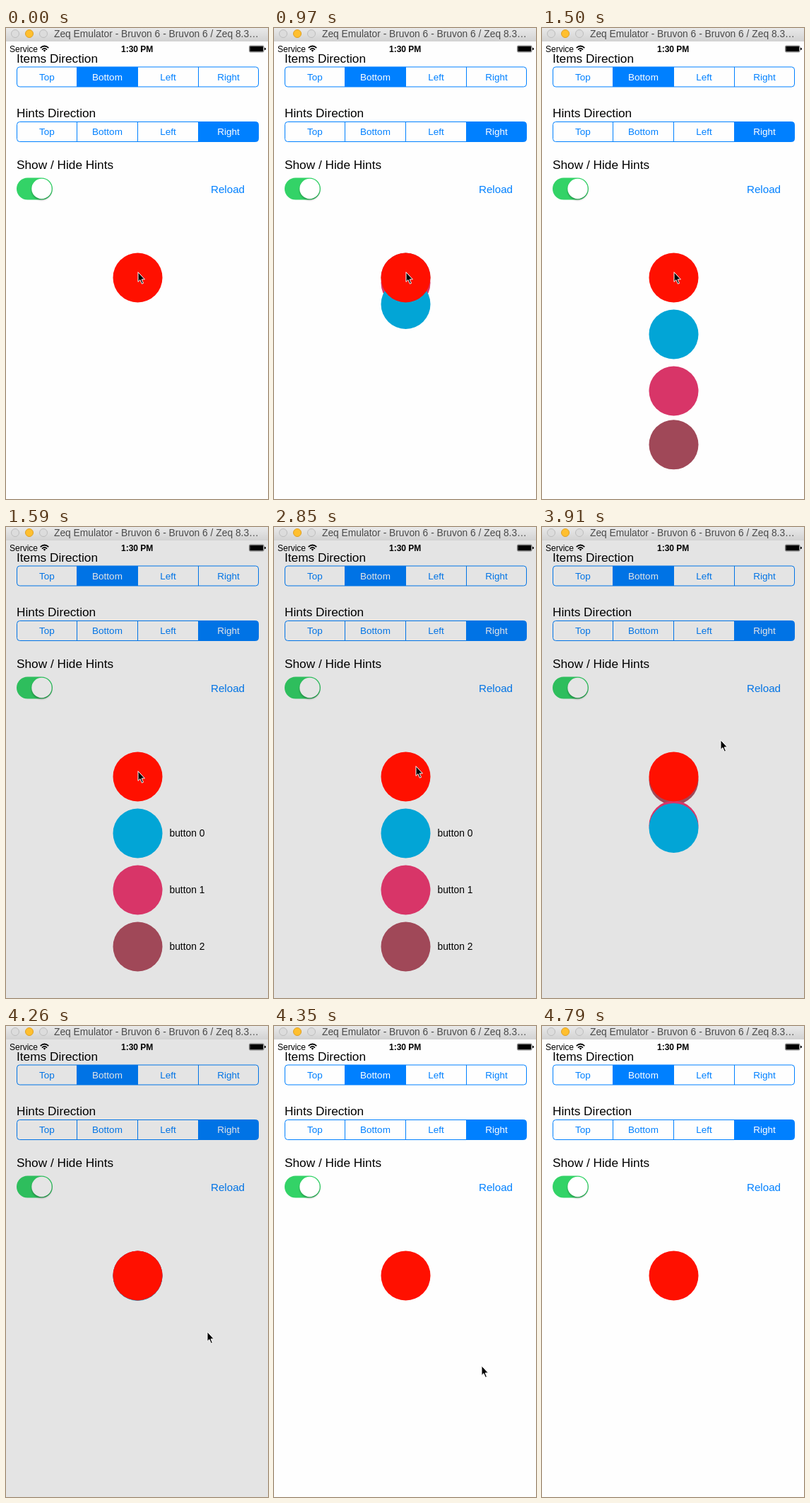
An HTML page for the animation above (5150 ms loop, 371 by 665 pixels).

```html
<!DOCTYPE html>
<html lang="en">
<head>
<meta charset="utf-8">
<title>Expanding button menu</title>
<style>
  html, body { margin: 0; width: 100%; height: 100%; overflow: hidden; background: #fefefe; }
  svg { display: block; width: 100vw; height: 100vh; font-family: "Liberation Sans", sans-serif; }
  .heading { font-size: 17.25px; }
  .segment { font-size: 13.5px; text-anchor: middle; }
  .blue { fill: #0080ff; }
  .white { fill: #fff; }
</style>
</head>
<body>
<svg viewBox="0 0 371 665">
  <defs>
    <linearGradient id="chrome" x2="0" y2="1">
      <stop stop-color="#e9e9e9"/><stop offset="1" stop-color="#d2d2d2"/>
    </linearGradient>
    <filter id="soft" x="-30%" y="-30%" width="160%" height="160%"><feGaussianBlur stdDeviation="1.3"/></filter>
  </defs>

  <rect width="371" height="665" fill="#fefefe"/>

  <rect width="371" height="19" fill="url(#chrome)"/>
  <g fill="#dcdcdc" stroke="#bdbdbd">
    <circle cx="13" cy="8" r="5.5"/>
    <circle cx="33" cy="8" r="5.5" fill="#ffbf2f" stroke="#dfa023"/>
    <circle cx="53" cy="8" r="5.5"/>
  </g>
  <text x="68" y="13" font-size="13.8" fill="#4a4a4a">Zeq Emulator - Bruvon 6 - Bruvon 6 / Zeq 8.3…</text>

  <text x="5" y="34" font-size="12">Service</text>
  <g fill="none" stroke="#000" stroke-width="1.7">
    <path d="M48.7 28.2Q54.5 22.8 60.3 28.2M51 30.6Q54.5 27.3 58 30.6"/>
    <path d="M52.6 31.6Q54.5 30 56.4 31.6L54.5 33.8Z" fill="#000" stroke="none"/>
  </g>
  <text x="163" y="33.5" font-size="12" font-weight="bold">1:30 PM</text>
  <rect x="344.5" y="25" width="20.5" height="9" rx="1.5" fill="none" stroke="#000" stroke-width=".5"/>
  <rect x="345.3" y="25.8" width="18.9" height="7.4" rx=".7"/>
  <path d="M366 27.7Q368 28 368 29.5T366 31.3Z"/>

  <text class="heading" x="15" y="49">Items Direction</text>
  <text class="heading" x="15" y="125.5">Hints Direction</text>
  <text class="heading" x="15" y="199.3">Show / Hide Hints</text>
  <g id="controls"></g>

  <rect x="15" y="211.5" width="51" height="31" rx="15.5" fill="#33d367"/>
  <circle cx="50.5" cy="229" r="14.2" opacity=".27" filter="url(#soft)"/>
  <circle class="white" cx="50.5" cy="227" r="14.2"/>
  <text class="blue" x="314" y="233" font-size="15.2" text-anchor="middle">Reload</text>

  <rect id="shade" y="19" width="371" height="646" opacity=".1"/>
  <g id="items"></g>
  <circle cx="186.5" cy="352.5" r="35" fill="#ff1000"/>
  <g id="hints" font-size="13.8"></g>

  <g id="cursor">
    <g id="ring" fill="none">
      <circle cx="3.5" cy=".5" r="10" stroke="#000"/>
      <circle cx="3.5" cy=".5" r="9" stroke="#fff"/>
    </g>
    <path d="M2 .7V14.4L4.9 11.6L7.4 17.2L9.5 16.3L7.1 10.9H11.4Z" stroke="#fff"/>
  </g>
</svg>
<script>
const LOOP = 5150, MOVE_TIME = 480, SPACING = 80;
const ITEMS = [
  { color: '#02a5d6', opens: 747, closes: 3805 },
  { color: '#d83568', opens: 906, closes: 3649 },
  { color: '#a04858', opens: 1071, closes: 3477 },
];
// time, x, y
const CURSOR_PATH = [
  [0, 185, 344], [2840, 185, 344], [2850, 199, 337], [3200, 251, 300], [3920, 251, 300],
  [4000, 251, 308], [4085, 258, 342], [4262, 283, 431], [4530, 311, 579], [4710, 322, 654], [LOOP, 322, 654],
];
const byId = id => document.getElementById(id);

function add(parent, tag, attributes, text = '') {
  const node = document.createElementNS('http://www.w3.org/2000/svg', tag);
  for (const name in attributes) node.setAttribute(name, attributes[name]);
  node.textContent = text;
  return parent.appendChild(node);
}

function segmentedControl(top, selected) {
  const group = byId('controls');
  const edges = [15.5, 100.5, 186.5, 272.5, 357.5];
  const bottom = top + 28, left = edges[selected], right = edges[selected + 1];
  const fill = selected === 3
    ? `M${left} ${top}H${right - 4}q4 0 4 4V${bottom - 4}q0 4 -4 4H${left}Z`
    : `M${left} ${top}H${right}V${bottom}H${left}Z`;
  add(group, 'path', { d: fill, class: 'blue' });
  add(group, 'rect', { x: 15.5, y: top, width: 342, height: 28, rx: 4, fill: 'none', stroke: '#0080ff' });
  ['Top', 'Bottom', 'Left', 'Right'].forEach((label, i) => {
    if (i) add(group, 'path', { d: `M${edges[i]} ${top}V${bottom}`, stroke: '#0080ff' });
    add(group, 'text', {
      x: (edges[i] + edges[i + 1]) / 2, y: top + 18.7,
      class: `segment ${i === selected ? 'white' : 'blue'}`,
    }, label);
  });
}

segmentedControl(55, 1);
segmentedControl(132.5, 3);

ITEMS.forEach((item, i) => {
  item.distance = SPACING * (i + 1);
  add(byId('hints'), 'text', { x: 231.5, y: 357.3 + item.distance }, `button ${i}`);
});
[...ITEMS].reverse().forEach(item => {
  item.node = add(byId('items'), 'circle', { cx: 186.5, r: 35, fill: item.color });
});

// cubic-bezier(.42, 0, .58, 1), solved by bisection
function easeInOut(progress) {
  if (progress <= 0) return 0;
  if (progress >= 1) return 1;
  let low = 0, high = 1, u;
  for (let i = 0; i < 20; i++) {
    u = (low + high) / 2;
    const x = 1.26 * u * (1 - u) ** 2 + 1.74 * u * u * (1 - u) + u ** 3;
    if (x < progress) low = u; else high = u;
  }
  return u * u * (3 - 2 * u);
}

function recordedTime(t) {
  return t < 2843
    ? 450 + 88 * Math.floor((t - 436) / 88)
    : 2850 + 88.2 * Math.floor((t - 2843) / 88.2);
}

function cursorPosition(t) {
  const i = Math.max(1, CURSOR_PATH.findIndex(point => point[0] > t));
  const [t0, x0, y0] = CURSOR_PATH[i - 1], [t1, x1, y1] = CURSOR_PATH[i];
  const p = Math.max(0, (t - t0) / (t1 - t0));
  return [x0 + (x1 - x0) * p, y0 + (y1 - y0) * p].map(Math.round);
}

function show(id, visible) {
  byId(id).style.display = visible ? '' : 'none';
}

function draw(now) {
  const t = recordedTime(now % LOOP);
  const within = (from, to) => t >= from && t < to;

  show('shade', within(1585, 4340));
  show('items', within(785, 4340));
  show('hints', within(1585, 3370));
  show('ring', within(445, 620) || within(3190, 3370));
  show('cursor', t < 4780);

  for (const { node, distance, opens, closes } of ITEMS) {
    const spread = easeInOut((t - opens) / MOVE_TIME) - easeInOut((t - closes) / MOVE_TIME);
    node.setAttribute('cy', 352.5 + distance * spread);
  }
  byId('cursor').setAttribute('transform', `translate(${cursorPosition(t)})`);
}

const start = performance.now();
function frame() {
  draw(performance.now() - start);
  requestAnimationFrame(frame);
}
frame();
</script>
</body>
</html>
```
